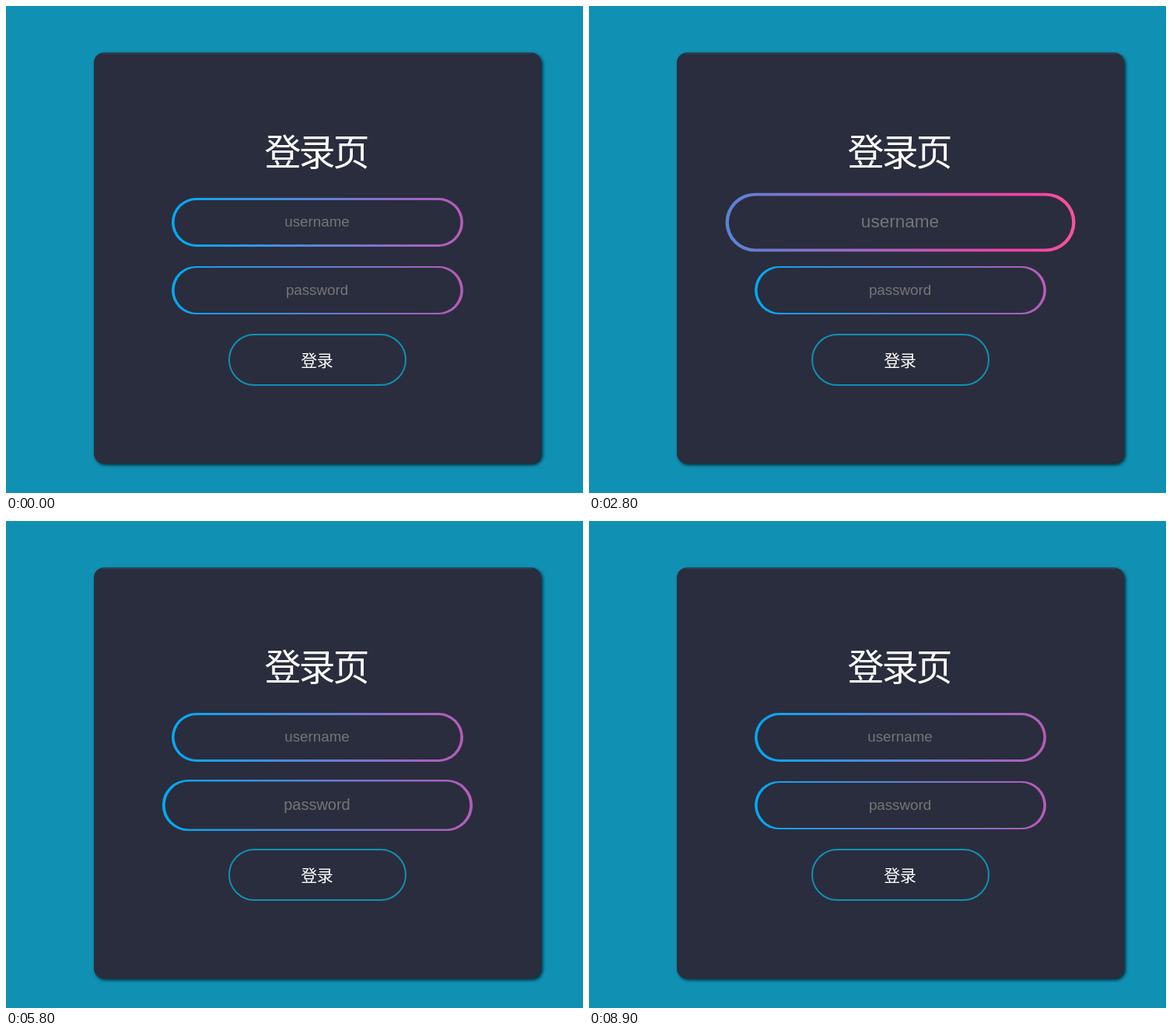
An HTML page with a canvas that plays this animation: 742 px wide and 627 px high, repeating every 9.4 s.

```html
<!DOCTYPE html>
<html lang="zh">
<head>
<meta charset="utf-8">
<title>登录页</title>
<style>
  html, body { margin: 0; width: 100%; height: 100%; overflow: hidden; background: #1091b4; }
  canvas { display: block; }
</style>
</head>
<body>
<canvas id="stage" width="742" height="627"></canvas>
<script>
const ctx = document.getElementById('stage').getContext('2d');
const LOOP = 9400, STEP = 100, FADE = 1000;
const CX = 400.5;
const TEAL = '#1090b2', DARK = '#2a2d3d';
const LATIN = '18.75px "Liberation Sans", Arial, sans-serif';
const HAN = '"Noto Sans CJK SC", "Noto Sans CJK", sans-serif';
const SPECTRUM = ['#03a9f4', '#f441a5', '#ffeb3b', '#09a8f4'];
const BAND = 1500, SPEED = 0.9; // gradient length in px, drift in px per ms

// show: first visible change, enter/leave: hover start and end
const fields = [
  { label: 'username', y: 278.5, h: 63, edge: 3, show: 1100, enter: 932, leave: 2805 },
  { label: 'password', y: 366, h: 62, edge: 2, show: 4100, enter: 3996, leave: 5405 }
];
const button = { y: 455.5, show: 6000, enter: 5960, leave: 7940 };

// cubic-bezier(.25, .1, .25, 1)
function ease(x) {
  if (x <= 0) return 0;
  if (x >= 1) return 1;
  let lo = 0, hi = 1, s = 0.5;
  for (let i = 0; i < 24; i++) {
    s = (lo + hi) / 2;
    if (0.75 * s * (1 - s) + s * s * s < x) lo = s; else hi = s;
  }
  return 0.3 * s * (1 - s) ** 2 + 3 * s * s * (1 - s) + s ** 3;
}

function hover(item, t) {
  if (t < item.show) return 0;
  return t < item.leave
    ? ease((t - item.enter) / FADE)
    : 1 - ease((t - item.leave) / FADE);
}

function pill(x, y, w, h, r, fill) {
  ctx.beginPath();
  ctx.roundRect(x, y, w, h, r);
  ctx.fillStyle = fill;
  ctx.fill();
}

function hanzi(text, x, y, size, pitch) {
  ctx.font = size + 'px ' + HAN;
  ctx.fillStyle = '#fff';
  [...text].forEach((c, i) => ctx.fillText(c, x + (i - (text.length - 1) / 2) * pitch, y));
}

function scaled(y, p, draw) {
  ctx.save();
  ctx.translate(CX, y);
  ctx.scale(1 + 0.2 * p, 1 + 0.2 * p);
  draw();
  ctx.restore();
}

function spectrum(left, shift) {
  const start = left - shift % BAND;
  const g = ctx.createLinearGradient(start, 0, start + 2 * BAND, 0);
  for (let k = 0; k < 2; k++)
    SPECTRUM.forEach((c, i) => g.addColorStop((k + i / 3) / 2, c));
  return g;
}

function drawField(f, t) {
  const p = hover(f, t), w = 375;
  const shift = t >= f.show && t < f.leave ? (t - f.enter) * SPEED : 0;
  const edge = f.edge + (3.2 - f.edge) * p, side = 3.6;
  scaled(f.y, p, () => {
    pill(-w / 2, -f.h / 2, w, f.h, f.h / 2, spectrum(-w / 2, shift));
    const ih = f.h - 2 * edge;
    pill(-w / 2 + side, -ih / 2, w - 2 * side, ih, ih / 2, DARK);
    ctx.font = LATIN;
    ctx.fillStyle = '#757575';
    ctx.fillText(f.label, -0.5, 5.7);
  });
}

function drawButton(t) {
  const p = hover(button, t);
  scaled(button.y, p, () => {
    ctx.beginPath();
    ctx.roundRect(-113.5, -32.5, 227, 65, 32.5);
    ctx.fillStyle = `rgba(16,144,178,${p})`;
    ctx.fill();
    ctx.strokeStyle = TEAL;
    ctx.lineWidth = 2;
    ctx.stroke();
    hanzi('登录', -0.5, 8.5, 21, 20.3);
  });
}

function drawCard() {
  ctx.fillStyle = '#1091b4';
  ctx.fillRect(0, 0, 742, 627);
  ctx.save();
  ctx.shadowColor = 'rgba(0,0,0,.75)';
  ctx.shadowBlur = 4;
  ctx.shadowOffsetX = 2;
  ctx.shadowOffsetY = 2;
  pill(113, 60, 575, 529, 13, DARK);
  ctx.restore();
  ctx.fillStyle = 'rgba(60,90,108,.6)';
  ctx.fillRect(124, 61, 553, 1);
  hanzi('登录页', 400, 205, 47, 44);
}

function render(t) {
  ctx.textAlign = 'center';
  drawCard();
  fields.forEach(f => drawField(f, t));
  drawButton(t);
}

const begin = performance.now();
function tick() {
  const t = (performance.now() - begin) % LOOP;
  render(Math.floor(t / STEP) * STEP);
  requestAnimationFrame(tick);
}
tick();
</script>
</body>
</html>
```
